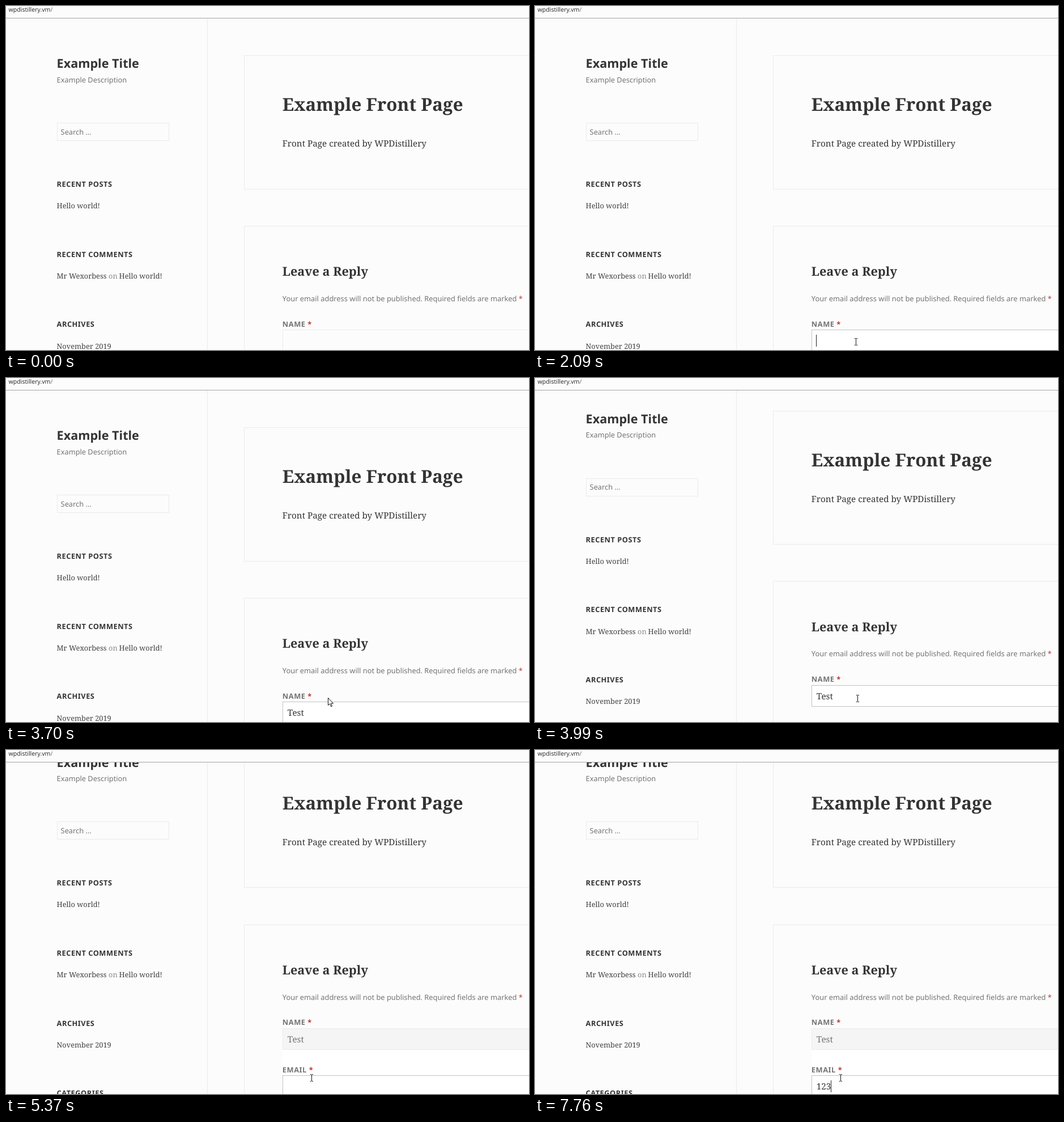
An HTML page with a canvas that plays this animation: 923x607 px, repeating every 8000 ms.

```html
<!DOCTYPE html>
<html lang="en">
<head>
<meta charset="utf-8">
<title>Comment form</title>
<style>
html, body { margin: 0; width: 100%; height: 100%; overflow: hidden; background: #fcfcfc; }
canvas { display: block; }
</style>
</head>
<body>
<canvas id="stage" width="923" height="607"></canvas>
<script>
const ctx = document.getElementById('stage').getContext('2d');
const LOOP = 8000, W = 923, H = 607;
const PAPER = '#fcfcfc', INK = '#333', LINK = '#404040', SOFT = '#747474';
const LINE = '#ebebeb', FOCUS = '#c2c2c2', RED = '#bd3a34';
const SANS = '"Noto Sans", sans-serif', SERIF = '"Noto Serif", serif';

// Each list holds [start time, ...values]; the latest started entry applies.
const NAME_KEYS = [[0, ''], [2620, 'T'], [2900, 'Te'], [3020, 'Tes'], [3140, 'Test']];
const EMAIL_KEYS = [[0, ''], [6420, '1'], [6540, '12'], [6670, '123']];
const SCROLL = [[0, 0, 0], [3990, 29.4, 29.6], [4130, 79.8, 80.2]]; // sidebar, main column
const CARET = [[0, 0], [1130, 1], [1530, 0], [2090, 1], [3700, 0], [4830, 1], [5370, 0],
  [5780, 1], [6300, 0], [6420, 1], [7230, 0], [7760, 1]];
const POINTER = [[0, null], [460, beam, 568, 598], [580, beam, 565, 588], [740, beam, 564, 586],
  [3700, arrow, 568, 564], [3990, beam, 567, 559], [4130, arrow, 568, 564], [4260, arrow, 559, 557],
  [4410, beam, 548, 570], [4560, beam, 542, 572], [4680, beam, 537, 572]];

const at = (track, t) => track.findLast(entry => entry[0] <= t).slice(1);

let scroll = 0;
const pageY = y => Math.round(y - scroll);

function rect(x, y, w, h, color) {
  ctx.fillStyle = color;
  ctx.fillRect(x, y, w, h);
}

function box(x, y, w, h, border, fill = PAPER) {
  rect(x, y, w, h, border);
  rect(x + 1, y + 1, w - 2, h - 2, fill);
}

// Draws one run on its baseline and returns the x where it ends.
function write(str, x, y, font, color = INK, spacing = 0) {
  ctx.font = font;
  ctx.letterSpacing = spacing + 'px';
  ctx.fillStyle = color;
  ctx.fillText(str, x, y);
  return x + ctx.measureText(str).width;
}

const text = (str, x, y, font, color, spacing) => write(str, x, pageY(y), font, color, spacing);

function sidebar() {
  const x = 89.6, small = `12.8px ${SERIF}`;
  rect(355, 22, 1, H, LINE);
  text('Example Title', x, 109.4, `bold 21.6px ${SANS}`);
  text('Example Description', x, 134.8, `12.8px ${SANS}`, SOFT);
  box(90, pageY(206.2), 198, 32, LINE);
  text('Search …', 96.6, 226.8, `12.8px ${SANS}`, SOFT);

  ['RECENT POSTS', 'RECENT COMMENTS', 'ARCHIVES', 'CATEGORIES'].forEach((title, i) =>
    text(title, x, 319 + i * 123.7, `bold 12.8px ${SANS}`, INK, 0.51));
  text('Hello world!', x, 357.2, small, LINK);
  text('Mr Wexorbess', x, 480.9, small, LINK);
  text('on', 181, 480.9, small, '#8a8a8a');
  text('Hello world!', 199.6, 480.9, small, LINK);
  text('November 2019', x, 604.6, small, LINK);
}

function label(str, y) {
  const font = `bold 12.86px ${SANS}`;
  const end = text(str + ' ', 487.8, y, font, SOFT, 0.51);
  text('*', end, y, font, RED);
}

function field(y, value, focused, caret) {
  const top = pageY(y), font = `15.27px ${SERIF}`;
  const fill = focused ? '#fff' : value ? '#f5f5f5' : PAPER;
  box(488, top, 500, 38, focused ? FOCUS : LINE, fill);
  const end = write(value, 496.8, top + 25, font, focused ? INK : SOFT);
  if (focused && caret) rect(Math.floor(end), top + 9, 1, 21, '#222');
}

function article() {
  const x = 487.8, top = pageY(87.4);
  box(420, top, 600, pageY(322.6) - top + 1, LINE);
  text('Example Front Page', x, 185.4, `bold 31.35px ${SERIF}`);
  text('Front Page created by WPDistillery', x, 248.4, `15.27px ${SERIF}`);
}

function replyForm(t) {
  const x = 487.8, [caret] = at(CARET, t);
  const onName = t >= 1130 && t < 4830, onEmail = t >= 4830;
  box(420, pageY(388), 600, 500, LINE);
  text('Leave a Reply', x, 476.2, `bold 21.7px ${SERIF}`);
  const note = 'Your email address will not be published. Required fields are marked ';
  const end = text(note, x, 520.7, `12.86px ${SANS}`, SOFT);
  text('*', end, 520.7, `12.86px ${SANS}`, RED);

  if (onEmail) rect(488, pageY(609.1), W, 46, '#fff');
  label('NAME', 565.6);
  field(571.1, at(NAME_KEYS, t)[0], onName, caret);
  label('EMAIL', 649);
  field(654.3, at(EMAIL_KEYS, t)[0], onEmail, caret);
}

function addressBar() {
  rect(0, 0, W, 21, PAPER);
  rect(0, 21, W, 1, '#a5a5a5');
  const font = '10.6px "Open Sans", sans-serif';
  const end = write('wpdistillery.vm', 4.5, 10, font, '#222');
  write('/', end, 10, font, '#666');
}

function beam(x, y) {
  for (const edge of [y, y + 12]) {
    rect(x, edge, 2, 1, '#111');
    rect(x + 3, edge, 2, 1, '#111');
  }
  rect(x + 2, y + 1, 1, 11, '#111');
}

function arrow(x, y) {
  const shape = new Path2D('M.5 .5V13.5L3.5 10.8 5.6 15.8 7.6 15 5.5 10.2H9.5Z');
  ctx.save();
  ctx.translate(x, y);
  ctx.fillStyle = '#fff';
  ctx.strokeStyle = '#111';
  ctx.fill(shape);
  ctx.stroke(shape);
  ctx.restore();
}

function draw(now) {
  const t = now % LOOP;
  const [sideScroll, mainScroll] = at(SCROLL, t);
  ctx.textRendering = 'geometricPrecision';
  rect(0, 0, W, H, PAPER);
  scroll = sideScroll;
  sidebar();
  scroll = mainScroll;
  article();
  replyForm(t);
  addressBar();
  const [pointer, x, y] = at(POINTER, t);
  if (pointer) pointer(x, y);
  requestAnimationFrame(draw);
}

requestAnimationFrame(draw);
</script>
</body>
</html>
```
